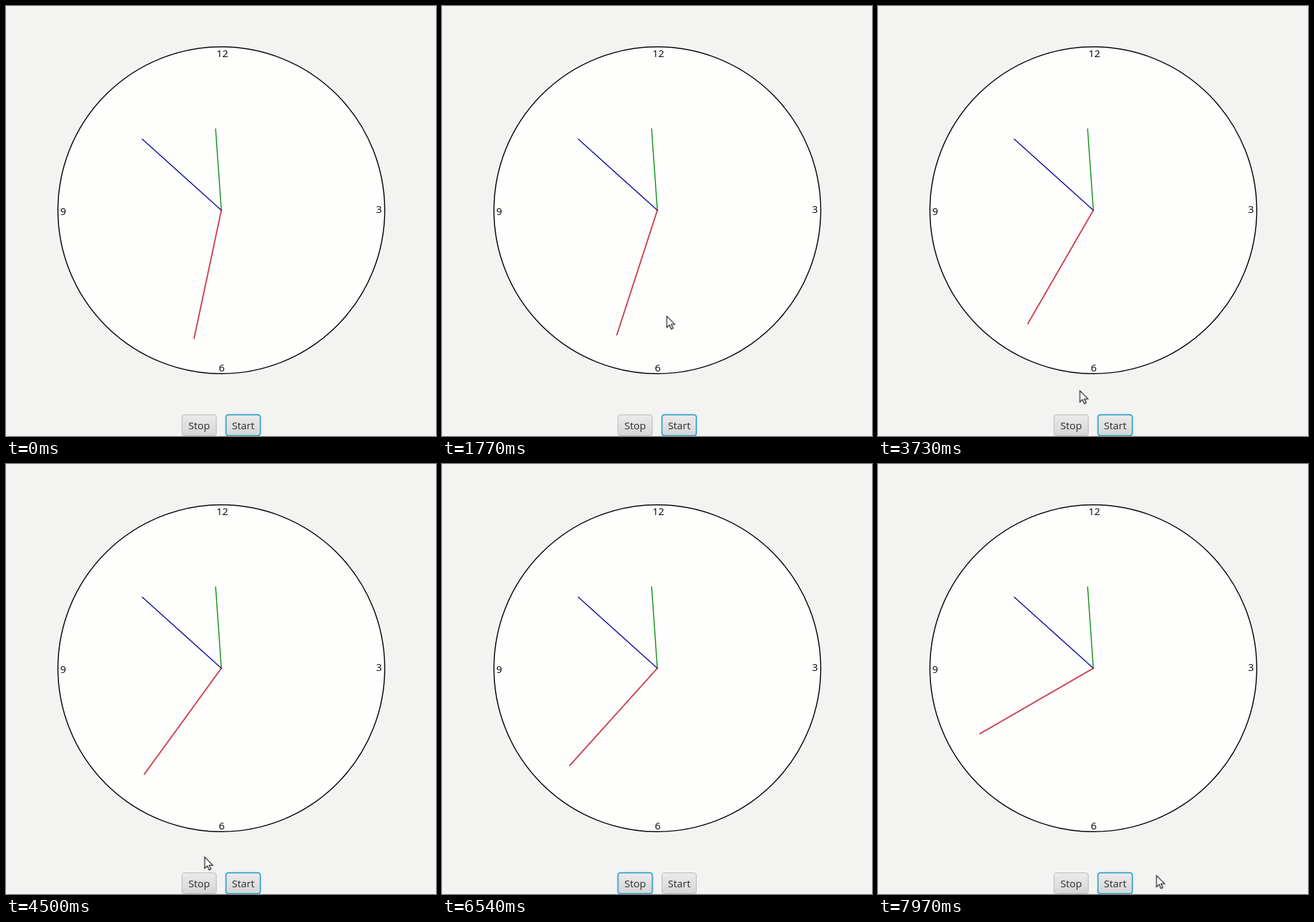
An HTML page that plays this animation: 640 by 640 pixels, repeating every 8000 ms.

```html
<!DOCTYPE html>
<html lang="en">
<head>
<meta charset="utf-8">
<title>Clock</title>
<style>
  html, body { margin: 0; width: 100%; height: 100%; overflow: hidden; background: #f3f3f1; }
  svg { display: block; width: 100vw; height: 100vh; }
  text { font: 15.2px "Open Sans", "Noto Sans", sans-serif; text-anchor: middle; fill: #000; }
  .label { fill: #2c2c2c; }
  .hand { stroke-width: 1.5; stroke-linecap: square; }
  .edge { fill: none; stroke: #b9b9b9; }
  .focus { fill: none; stroke: #1f9dc4; stroke-width: 1.5; }
  .glow { fill: none; stroke: #a6d8e6; stroke-width: 1; opacity: .7; }

  .second { animation: tick 8s step-end infinite; }
  .cursor { animation: roam 8s linear infinite; }
  .stop-focus { animation: stop-focus 8s step-end infinite; }
  .start-focus { animation: start-focus 8s step-end infinite; }
  .hover { animation: hover 8s step-end infinite; }

  @keyframes tick {
    0% { transform: rotate(192deg); }
    13.5% { transform: rotate(198deg); }
    26% { transform: rotate(204deg); }
    38.5% { transform: rotate(210deg); }
    51% { transform: rotate(216deg); }
    63.5% { transform: rotate(222deg); }
    96.25%, 100% { transform: rotate(240deg); }
  }
  @keyframes roam {
    0%, 6% { transform: translate(350px, 645px); }
    13% { transform: translate(344px, 545px); }
    22.125% { transform: translate(334.5px, 461.5px); }
    25% { transform: translate(331px, 466px); }
    34.125% { transform: translate(294.5px, 553.5px); }
    46.625% { transform: translate(300.5px, 572.5px); }
    56% { transform: translate(296px, 584px); }
    62.5% { transform: translate(287px, 607px); }
    65% { transform: translate(285.5px, 609.5px); }
    69% { transform: translate(285.5px, 613px); }
    72%, 81% { transform: translate(292px, 645px); }
    87.5% { transform: translate(350px, 641px); }
    93% { transform: translate(383px, 626px); }
    99.6%, 100% { transform: translate(414.5px, 612.5px); }
  }
  @keyframes stop-focus {
    0%, 87.5%, 100% { opacity: 0; }
    68.75% { opacity: 1; }
  }
  @keyframes start-focus {
    0%, 87.5%, 100% { opacity: 1; }
    68.75% { opacity: 0; }
  }
  @keyframes hover {
    0%, 71%, 100% { opacity: 0; }
    62.75% { opacity: 1; }
  }
</style>
</head>
<body>
<svg viewBox="0 0 640 640">
  <defs>
    <linearGradient id="face" x2="0" y2="1">
      <stop stop-color="#ebebeb"/>
      <stop offset="1" stop-color="#d6d6d6"/>
    </linearGradient>
    <linearGradient id="lit" x2="0" y2="1">
      <stop stop-color="#f7f7f7"/>
      <stop offset="1" stop-color="#e6e6e6"/>
    </linearGradient>
    <rect id="box" x=".5" y=".5" width="51" height="31" rx="3.5"/>
    <g id="ring">
      <rect class="glow" x="-.7" y="-.7" width="53.4" height="33.4" rx="4.5"/>
      <use href="#box" class="focus"/>
    </g>
  </defs>

  <rect width="640" height="640" fill="#f3f3f1"/>
  <circle cx="320.5" cy="304" r="243.2" fill="#fefefd" stroke="#000" stroke-width="1.5"/>
  <text x="322" y="76">12</text>
  <text x="555" y="308">3</text>
  <text x="321" y="543.5">6</text>
  <text x="85" y="311">9</text>

  <g transform="translate(320.5 304)">
    <path class="hand" d="M0 0L-8.5-121" stroke="#129018"/>
    <path class="hand" d="M0 0L-117.5-105.7" stroke="#0c0c9c"/>
    <path class="hand second" d="M0 0V-195" stroke="#b80418"/>
  </g>

  <g transform="translate(261.5 608)">
    <use href="#box" fill="url(#face)"/>
    <use href="#box" class="hover" fill="url(#lit)"/>
    <use href="#box" class="edge"/>
    <use href="#ring" class="stop-focus"/>
    <text class="label" x="26" y="22">Stop</text>
  </g>
  <g transform="translate(327 608)">
    <use href="#box" fill="url(#face)"/>
    <use href="#box" class="edge"/>
    <use href="#ring" class="start-focus"/>
    <text class="label" x="26" y="22">Start</text>
  </g>

  <path class="cursor" d="M0 0V17L4 13.2L6.6 19.2L9.4 18L6.8 12.2H12Z" fill="#fff" stroke="#000" stroke-width="1.1"/>
</svg>
</body>
</html>
```
